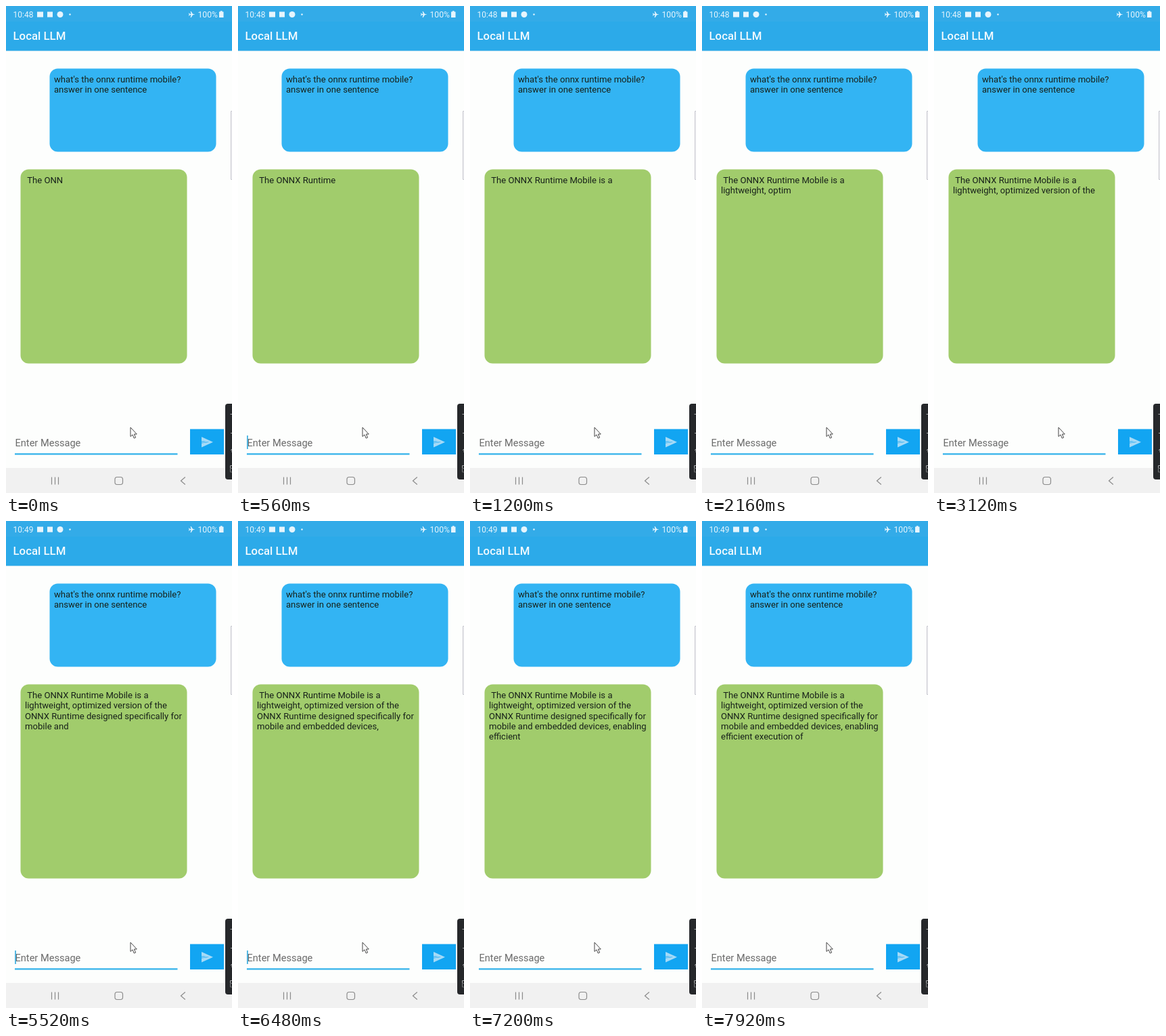
Recreate the animation shown at these times as an HTML page. Size 334 by 720 pixels, loop 8 s.

```html
<!DOCTYPE html>
<html lang="en">
<head>
<meta charset="utf-8">
<title>Local LLM</title>
<style>
  html, body { margin: 0; width: 100%; height: 100%; overflow: hidden; background: #fdfefd; }
  body { position: relative; font-family: Roboto, sans-serif; }
  svg { position: absolute; left: 0; top: 0; }
  p {
    position: absolute; margin: 0; width: 236px; white-space: pre-wrap;
    font-size: 13.1px; line-height: 15.35px; color: #17211a;
  }
  #ask { left: 71px; top: 100.7px; }
  #reply { left: 28px; top: 249.9px; }
</style>
</head>
<body>
<svg width="334" height="720" viewBox="0 0 334 720">
  <!-- status bar and title -->
  <rect width="334" height="66" fill="#2caae9"/>
  <rect width="334" height="23" fill="#33abe8"/>
  <rect y="66" width="334" height="1" fill="#b9dff2"/>
  <g fill="#e6f5fd" font-size="12">
    <text id="clock" x="10.5" y="16.5"></text>
    <rect x="46" y="8.5" width="9" height="8"/>
    <rect x="61" y="8.5" width="8" height="8"/>
    <circle cx="80" cy="12.5" r="4.5"/>
    <circle cx="94.5" cy="12.5" r="1.2"/>
    <path d="M279.5 12.5 L276 11.8 L273.6 8 H272.6 L273.6 11.8 H271.8 L270.8 10.5 H270 L270.6 12.5 L270 14.5 H270.8 L271.8 13.2 H273.6 L272.6 17 H273.6 L276 13.2 Z"/>
    <text x="283.5" y="16.5" font-size="12.2">100%</text>
    <path d="M315 8.5 H316.8 V7.3 H319.6 V8.5 H321.5 V17 H315 Z"/>
  </g>
  <text x="10.5" y="50" font-size="16.8" font-weight="500" fill="#f3fafe">Local LLM</text>

  <!-- bubbles -->
  <rect x="64.5" y="92.5" width="246" height="123" rx="12" fill="#33b4f3"/>
  <rect x="21.5" y="241.5" width="246" height="287" rx="12" fill="#a1cc6c"/>

  <!-- message field -->
  <text x="13.5" y="650.5" font-size="14.6" fill="#6b6b6b">Enter Message</text>
  <rect x="13" y="661.3" width="240.5" height="2.2" fill="#2fb1ea"/>
  <rect id="caret" x="13.2" y="635" width="1.6" height="20" fill="#2fa9dc"/>
  <rect x="272" y="625.5" width="50" height="37.5" fill="#12a5f2"/>
  <path d="M289 637 L306 644.7 L289 652.5 V646.5 L300 644.7 L289 643 Z" fill="#a5daf7"/>
  <path d="M289 643 L300 644.7 L289 646.5 Z" fill="#6fc6f5"/>

  <!-- right edge -->
  <path d="M334 155.5 H332.5 V256.5 H334" fill="#f5f5f8" stroke="#c4c4cc"/>
  <path d="M334 588 H328 Q324 588 324 592 V696 Q324 700 328 700 H334 Z" fill="#26282b"/>
  <path d="M331.5 603.5 H334 M332 631.5 H334 M332 657 L334 655 V660 M334 679.5 H331.5 V689 H334" fill="none" stroke="#a9abad"/>

  <!-- navigation bar -->
  <rect y="683" width="334" height="37" fill="#f1f1f1"/>
  <path d="M334 683 H324 V696 Q324 700 328 700 H334 Z" fill="#26282b"/>
  <path d="M334 683.5 H331.5 V689 H334" fill="none" stroke="#77797b"/>
  <g fill="none" stroke="#8b8b8b" stroke-width="1.2">
    <path d="M67.5 696.5 V707.5 M72.5 696.5 V707.5 M77.5 696.5 V707.5 M264.8 696.5 L258.5 702 L264.8 707.5"/>
    <rect x="161" y="696.5" width="11.5" height="11" rx="3.2"/>
  </g>

  <!-- pointer -->
  <path d="M184 623 V636.5 L187 633.8 L189.3 639 L191.6 638 L189.4 633 H193.3 Z" fill="#fff" stroke="#444" stroke-width="1"/>
</svg>
<p id="ask">what's the onnx runtime mobile?
answer in one sentence</p>
<p id="reply"></p>
<script>
  const LOOP = 8000, TOKEN_MS = 254, TOKEN_LEAD = 195, MINUTE_AT = 3840;
  const tokens = (" The| ON|N|X| Runtime| Mobile| is| a| light|weight|,| optim|ized| version| of| the" +
    "| ON|N|X| Runtime| designed| specifically| for| mobile| and| embed|ded| devices|,| en|abling" +
    "| efficient| execution| of").split("|");
  const el = id => document.getElementById(id);
  const reply = el("reply"), clock = el("clock"), caret = el("caret");

  function draw(now) {
    const t = now % LOOP;
    const count = 3 + Math.floor((t + TOKEN_LEAD) / TOKEN_MS);
    const blink = t % 1000;
    reply.textContent = tokens.slice(0, count).join("");
    clock.textContent = t < MINUTE_AT ? "10:48" : "10:49";
    caret.style.opacity = blink >= 250 && blink < 750 ? 1 : 0;
  }

  let start;
  function tick(now) {
    start ??= now;
    draw(now - start);
    requestAnimationFrame(tick);
  }
  draw(0);
  requestAnimationFrame(tick);
</script>
</body>
</html>
```
